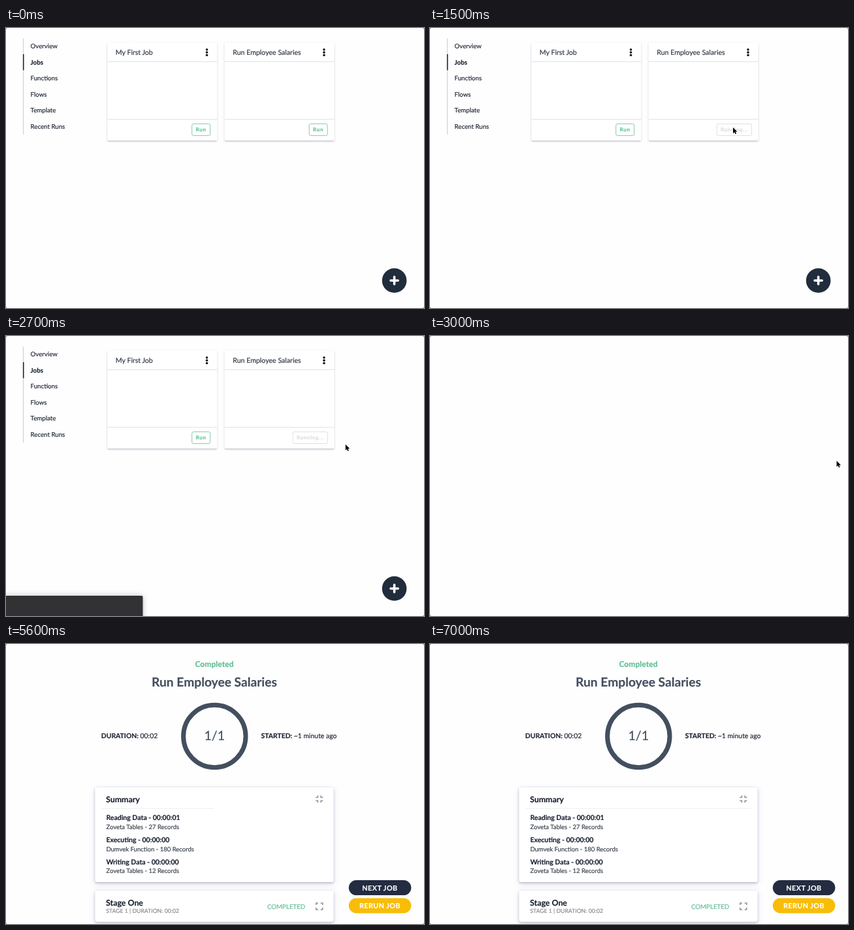
These frames come from a looping animation (640 by 428 pixels, 7.3 s). An HTML page:

```html
<!DOCTYPE html>
<html lang="en">
<head>
<meta charset="utf-8">
<title>Job runner</title>
<style>
  html, body { margin: 0; width: 100%; height: 100%; overflow: hidden; background: #777; }
  svg { display: block; width: 100vw; height: 100vh; font-family: Lato, "Open Sans", sans-serif; }
  text { stroke-width: .16px; text-rendering: geometricPrecision; }
  .b { font-weight: 700; }
</style>
</head>
<body>
<svg id="stage" viewBox="0 0 640 428">
  <defs>
    <filter id="cardShadow" x="-10%" y="-10%" width="120%" height="130%">
      <feDropShadow dx="0" dy="1.2" stdDeviation="1.3" flood-color="#30344f" flood-opacity=".34"/>
    </filter>
    <filter id="panelShadow" x="-10%" y="-20%" width="120%" height="160%">
      <feDropShadow dx="0" dy="1.2" stdDeviation="1.6" flood-color="#30344f" flood-opacity=".32"/>
      <feDropShadow dx="0" dy="3" stdDeviation="4.5" flood-color="#6068a0" flood-opacity=".18"/>
    </filter>
    <filter id="toastShadow" x="-10%" y="-50%" width="120%" height="200%">
      <feDropShadow dx="0" dy="0" stdDeviation="4" flood-color="#000" flood-opacity=".25"/>
    </filter>
  </defs>
  <rect width="640" height="428" rx="2.5" fill="#fefefe"/>
  <g id="jobs"></g>
  <g id="queued"></g>
  <g id="completed"></g>
  <rect id="toast" x="-4" width="213.5" height="40" rx="2" fill="#323234" filter="url(#toastShadow)"/>
  <path id="cursor" d="M0 0V9.2L2.1 7.3 3.5 10.3 5 9.6 3.7 6.6H6.5Z" fill="#000" stroke="#fff" stroke-width=".7" paint-order="stroke"/>
</svg>
<script>
const LOOP = 7300, STEP = 100;
const INK = '#1a2130', SLATE = '#434f5f', GREEN = '#5fbd94', GREY = '#87878c';
const $ = id => document.getElementById(id);

const text = (x, y, size, fill, str, extra = '') =>
  `<text x="${x}" y="${y}" font-size="${size}" fill="${fill}" stroke="${fill}" ${extra}>${str}</text>`;
const bold = (x, y, size, fill, str, extra = '') => text(x, y, size, fill, str, 'class="b" ' + extra);
const mid = 'text-anchor="middle"';
const box = (x, y, w, h, r, attrs) => `<rect x="${x}" y="${y}" width="${w}" height="${h}" rx="${r}" ${attrs}/>`;
const line = (x1, y1, x2, y2, color, width = 1, extra = '') =>
  `<path d="M${x1} ${y1}L${x2} ${y2}" stroke="${color}" stroke-width="${width}" ${extra}/>`;
const panel = (y, w, h) => box(136.5, y, w, h, 3, 'fill="#fff" filter="url(#panelShadow)"');

function outlineButton(id, x, w, color, border, label, spacing) {
  return `<g id="${id}">` + box(x, 146.5, w, 18, 2.5, `fill="#fff" stroke="${border}"`) +
    bold(x + 5.8, 158.4, 8, color, label, `letter-spacing="${spacing}"`) + '</g>';
}

function jobCard(x, title, id) {
  let s = box(x, 22, 168, 150, 2, 'fill="#fff" filter="url(#cardShadow)"');
  s += line(x, 51.5, x + 168, 51.5, '#e2e3e8') + line(x, 139.5, x + 168, 139.5, '#e2e3e8');
  s += text(x + 12.7, 41, 10.6, '#2b3340', title);
  for (const y of [33, 37.3, 41.6]) s += `<circle cx="${x + 152.4}" cy="${y}" r="1.75" fill="#111"/>`;
  return s + outlineButton(id, x + 129.6, 28, GREEN, '#86cbb0', 'Run', .8);
}

function pill(y, color, label) {
  return box(524.8, y, 95.6, 23, 11.5, `fill="${color}"`) +
    bold(572.5, y + 15.4, 10.8, '#fff', label, mid + ' letter-spacing=".45"');
}

function ring(cx, cy, color, label) {
  return `<circle cx="${cx}" cy="${cy}" r="47.7" fill="none" stroke="${color}" stroke-width="7"/>` +
    text(cx, cy + 5.6, 19.6, SLATE, label, mid);
}

// Four corner brackets, pointing outwards to expand or inwards to collapse.
function brackets(cx, cy, inward) {
  const d = inward ? 'M-5.5 -2.4H-2.4V-5.5' : 'M-5 -1.9V-5H-1.9';
  const corners = [0, 90, 180, 270].map(a => `<path d="${d}" transform="rotate(${a})"/>`).join('');
  return `<g transform="translate(${cx} ${cy})" fill="none" stroke="#8f8f94" stroke-width="1.5">${corners}</g>`;
}

function buildJobs() {
  const items = ['Overview', 'Jobs', 'Functions', 'Flows', 'Template', 'Recent Runs'];
  let s = line(26.5, 16, 26.5, 163, '#cfd0d4', 1.2) + line(26.7, 40, 26.7, 64.5, '#1b2230', 1.6);
  items.forEach((label, i) => {
    s += (i === 1 ? bold : text)(37.6, 31.4 + 24.52 * i, 9.7, INK, label);
  });
  s += jobCard(155.1, 'My First Job', 'runFirst') + jobCard(334.6, 'Run Employee Salaries', 'run');
  s += outlineButton('running', 439.1, 53.4, '#dadadd', '#e0e0e3', 'Running...', .7);
  s += '<circle cx="594.6" cy="386" r="18.8" fill="#212c3c"/>';
  const round = 'stroke-linecap="round"';
  return s + line(589, 386, 600.2, 386, '#fff', 3.6, round) + line(594.6, 380.4, 594.6, 391.6, '#fff', 3.6, round);
}

function buildQueued() {
  return bold(319.7, 34.6, 12.1, '#d9d9dc', 'Queued', mid) +
    ring(320, 126, '#dcdcde', '0/0') +
    bold(158.5, 129.6, 10.2, INK, 'DURATION: <tspan font-weight="400" font-size="9.6">-</tspan>') +
    bold(394.5, 129.6, 10.2, INK, 'STARTED: <tspan font-weight="400" font-size="9.6">~1 minute ago</tspan>') +
    panel(204, 366.5, 47) +
    bold(153.4, 226.4, 12.4, INK, 'Stage One') +
    text(153.4, 238, 8.7, GREY, 'STAGE 1 | DURATION: -') +
    brackets(481.2, 227.3) +
    pill(388.4, '#c65b76', 'CANCEL JOB');
}

function buildCompleted() {
  const rows = [
    ['Reading Data - 00:00:01', 'Zoveta Tables - 27 Records'],
    ['Executing - 00:00:00', 'Dumvek Function - 180 Records'],
    ['Writing Data - 00:00:00', 'Zoveta Tables - 12 Records']
  ];
  let s = bold(319, 34.6, 12.1, GREEN, 'Completed', mid) +
    bold(319, 64.8, 19.2, SLATE, 'Run Employee Salaries', mid) +
    ring(319.3, 141, SLATE, '1/1') +
    bold(145.8, 144.3, 10.4, INK, 'DURATION: <tspan font-weight="400">00:02</tspan>') +
    bold(390.6, 144.3, 10.4, INK, 'STARTED: <tspan font-weight="400">~1 minute ago</tspan>') +
    panel(219, 365, 145) +
    bold(153, 241.8, 12.4, INK, 'Summary') +
    brackets(479.8, 237, true) +
    '<rect id="rule" x="147" y="251" height="1" fill="#efeff2"/>';
  rows.forEach(([head, detail], i) => {
    const y = 269.2 + 33.75 * i;
    s += bold(153.4, y, 10.5, INK, head) + text(153.4, y + 13.6, 9.5, '#343b46', detail);
  });
  return s + panel(377, 365, 47.5) +
    bold(153, 399.6, 12.4, INK, 'Stage One') +
    text(153.2, 411, 8.7, GREY, 'STAGE 1 | DURATION: 00:02') +
    text(400, 405, 9.7, GREEN, 'COMPLETED') +
    brackets(479.8, 401) +
    pill(361.1, '#232c40', 'NEXT JOB') + pill(388.4, '#f8bd08', 'RERUN JOB');
}

$('jobs').innerHTML = buildJobs();
$('queued').innerHTML = buildQueued();
$('completed').innerHTML = buildCompleted();

// time, x, y
const cursorPath = [[700, 621, 40], [1100, 462.8, 150], [1300, 464, 152], [2500, 464, 152], [3000, 622.6, 190.8]];

function cursorAt(t) {
  const i = Math.max(1, cursorPath.findIndex(p => p[0] >= t));
  const [t0, x0, y0] = cursorPath[i - 1], [t1, x1, y1] = cursorPath[i];
  const k = (t - t0) / (t1 - t0), e = k * k * (3 - 2 * k);
  return [x0 + (x1 - x0) * e, y0 + (y1 - y0) * e];
}

const show = (id, on) => $(id).setAttribute('visibility', on ? 'visible' : 'hidden');
const within = (t, from, to) => t >= from && t < to;

function render(ms) {
  const t = Math.floor(ms % LOOP / STEP) * STEP;
  const hasCursor = within(t, 700, 3100);
  show('jobs', t < 2800);
  show('run', t < 1500);
  show('running', within(t, 1500, 2800));
  show('queued', within(t, 3100, 5600));
  show('completed', t >= 5600);
  show('toast', within(t, 2500, 2800));
  $('toast').setAttribute('y', 425 - 28 * (1 - (1 - Math.min(1, Math.max(0, (t - 2500) / 200))) ** 2));
  $('rule').setAttribute('width', t < 5700 ? 171 : 344);
  show('cursor', hasCursor);
  if (hasCursor) $('cursor').setAttribute('transform', `translate(${cursorAt(t).join(' ')})`);
}

const start = performance.now();
function tick() {
  render(performance.now() - start);
  requestAnimationFrame(tick);
}
tick();
</script>
</body>
</html>
```
